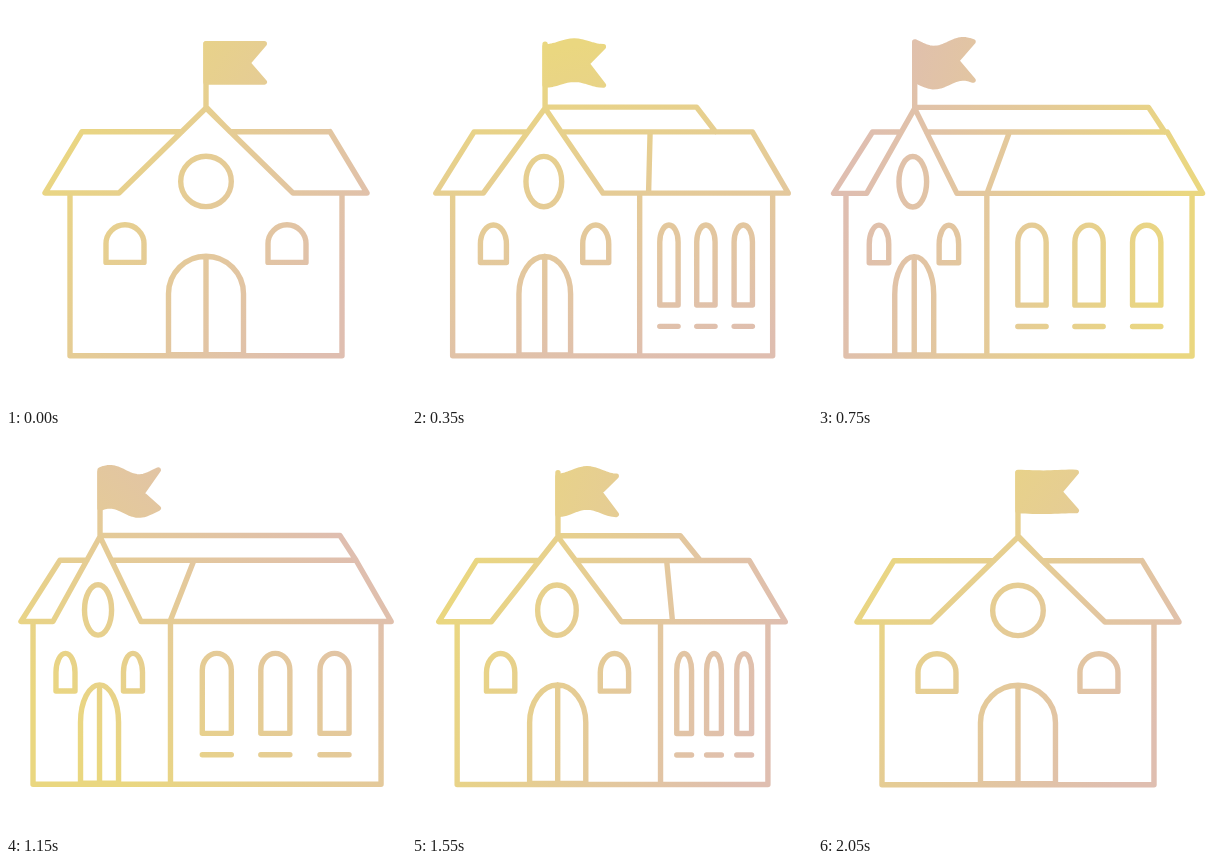
Recreate the animation shown at these times as an HTML page. Size 400x400 px, loop 2070 ms.

```html
<!DOCTYPE html>
<html lang="en">
<head>
<meta charset="utf-8">
<title>School</title>
<style>
  html, body { margin: 0; width: 100%; height: 100%; overflow: hidden; background: #fff; }
  svg { display: block; width: 100vw; height: 100vh; }
  path { stroke: url(#tint); stroke-width: 5.4; stroke-linecap: round; stroke-linejoin: round; }
</style>
</head>
<body>
<svg viewBox="0 0 400 400">
  <defs>
    <linearGradient id="tint" gradientUnits="userSpaceOnUse" x1="35" y1="200" x2="365" y2="200">
      <stop offset="0" stop-color="#ead780"/>
      <stop offset="1" stop-color="#dfbeb0"/>
    </linearGradient>
  </defs>
  <g id="school">
    <path id="lines" fill="none"/>
    <path id="flag" fill="url(#tint)"/>
  </g>
</svg>
<script>
const LOOP = 2070, TURN_START = 35, TURN_BACK = 1035;
const RIDGE = 101, TOP = 125.7, EAVE = 187, BASE = 349.7;
// [time, gradient angle]
const ANGLES = [[0, 35], [350, 75], [750, 192], [1150, 315], [1550, 375], [1850, 390], [LOOP, 395]];

const $ = id => document.getElementById(id);
const mix = (a, b, k) => a + (b - a) * k;
const clamp = v => Math.min(1, Math.max(0, v));

// cubic-bezier(x1, 0, x2, 1)
function ease(u, x1, x2) {
  let lo = 0, hi = 1;
  for (let i = 0; i < 24; i++) {
    const s = (lo + hi) / 2, r = 1 - s;
    if (3 * r * r * s * x1 + 3 * r * s * s * x2 + s ** 3 < u) lo = s; else hi = s;
  }
  return lo * lo * (3 - 2 * lo);
}

function turnAt(t) {
  if (t < TURN_BACK) return ease(clamp((t - TURN_START) / (TURN_BACK - TURN_START)), .33, .04);
  return 1 - ease((t - TURN_BACK) / (LOOP - TURN_BACK), .65, .35);
}

function angleAt(t) {
  const i = ANGLES.findIndex(([end]) => t < end);
  const [t0, a0] = ANGLES[i - 1], [t1, a1] = ANGLES[i];
  return mix(a0, a1, (t - t0) / (t1 - t0));
}

const poly = (...pts) => 'M' + pts.map(p => p.map(v => v.toFixed(2)).join(' ')).join('L');

function arch(cx, hw, top, rise, bottom) {
  const l = cx - hw, r = cx + hw, y = top + rise;
  return `M${l} ${bottom}V${y}A${hw} ${rise} 0 0 1 ${r} ${y}V${bottom}Z`;
}

const oval = (cx, cy, rx, ry) =>
  `M${cx - rx} ${cy}a${rx} ${ry} 0 1 1 ${2 * rx} 0a${rx} ${ry} 0 1 1 ${-2 * rx} 0Z`;

function building(p) {
  const at = (a, b) => mix(a, b, p);
  const apex = at(200, 92.8), wallL = at(64, 26.6), corner = at(336, 162.5), wallR = at(336, 375.5);
  const eaveL = at(113, 46.2), eaveR = at(287, 133.3), tipL = at(39, 14.7), tipR = at(361, 385.5);
  const peak = 102, cut = (TOP - peak) / (EAVE - peak);
  const door = at(200, 92.3), doorHalf = at(37.5, 18.8), half = at(19, 9.4);
  const side = wallR - corner;

  const parts = [
    poly([apex, 38], [apex, peak]),
    poly([mix(apex, eaveL, cut), TOP], [at(76, 53.7), TOP], [tipL, EAVE], [eaveL, EAVE],
         [apex, peak], [eaveR, EAVE], [tipR, EAVE], [at(324, 350.3), TOP], [mix(apex, eaveR, cut), TOP]),
    poly([apex, RIDGE], [at(200, 335.5), RIDGE], [at(224, 351.5), TOP]),
    poly([at(324, 186.4), TOP], [at(361, 161.7), EAVE]),
    poly([wallL, EAVE], [wallL, BASE], [wallR, BASE], [wallR, EAVE]),
    poly([corner, EAVE], [corner, BASE]),
    oval(at(200, 90.8), 175.4, at(25.3, 13.4), 25.2),
    arch(at(119, 58.8), half, 218.8, 19, 256.4),
    arch(at(281, 125.2), half, 218.8, 19, 256.4),
    arch(door, doorHalf, 250.3, 37.5, BASE - 1),
    poly([door, 250.3], [door, BASE])
  ];
  for (const f of [.22, .498, .779]) {
    const x = corner + side * f, hw = side * .069;
    parts.push(arch(x, hw, 218.8, 17, 298.8), poly([x - hw, 320.2], [x + hw, 320.2]));
  }
  return parts.join('');
}

function banner(t, x) {
  const amp = 4.7 * Math.sin(Math.PI * t / LOOP) ** .7;
  const crest = (t - 350) / 1200;
  const wave = u => amp * Math.cos(2 * Math.PI * (u - crest));
  const edge = y => Array.from({ length: 17 }, (_, i) => [x + 58.3 * i / 16, y + wave(i / 16)]);
  return poly(...edge(37.7), [x + 41.8, 57 + wave(.8) * .6], ...edge(76).reverse()) + 'Z';
}

function draw() {
  const t = performance.now() % LOOP, p = turnAt(t);
  $('lines').setAttribute('d', building(p));
  $('flag').setAttribute('d', banner(t, mix(200, 92.8, p)));
  $('school').setAttribute('transform', `translate(0 ${t / LOOP})`);
  $('tint').setAttribute('gradientTransform', `rotate(${angleAt(t)} 200 200)`);
  requestAnimationFrame(draw);
}
draw();
</script>
</body>
</html>
```
